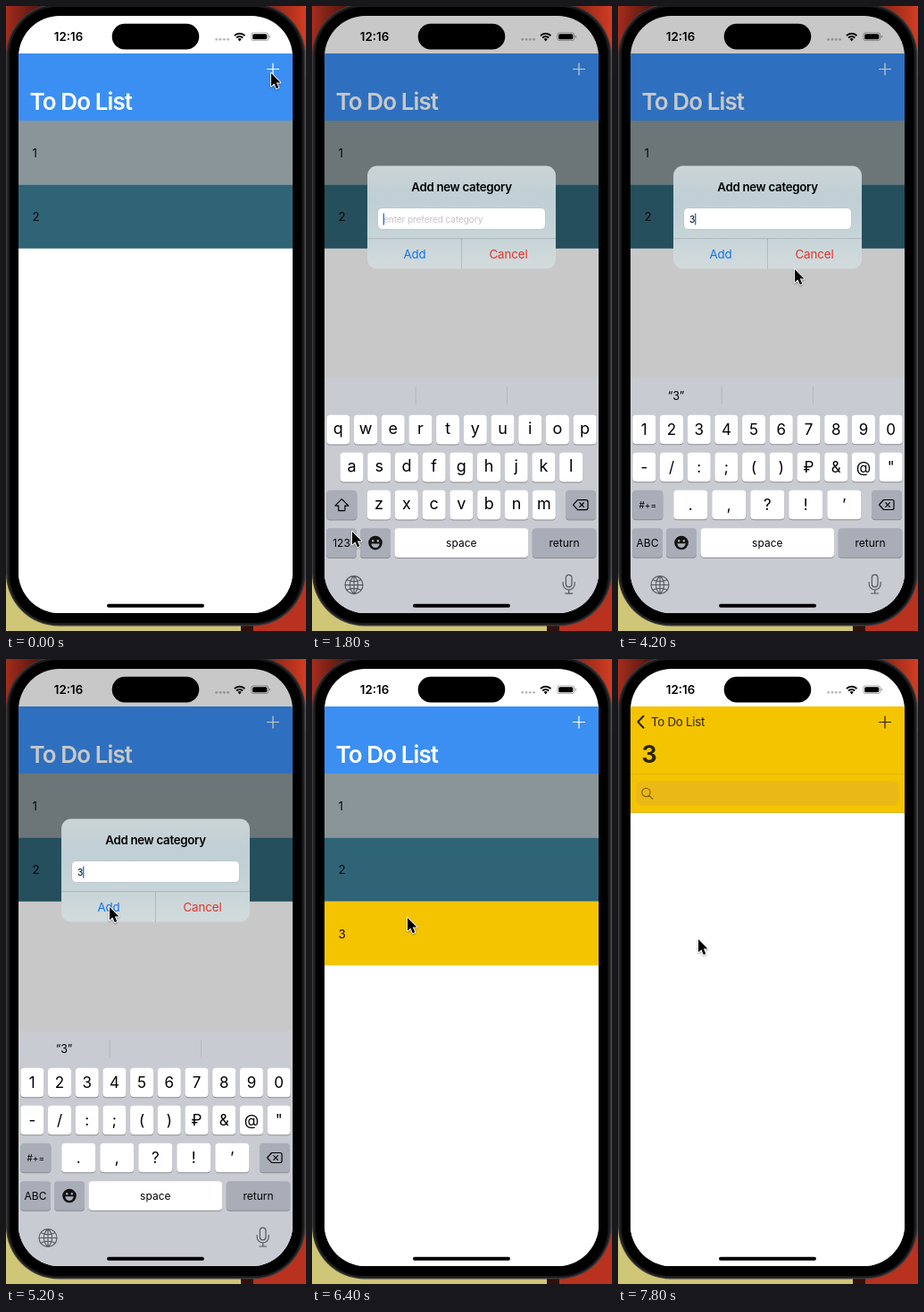
Recreate the animation shown at these times as an HTML page with a canvas. Size 336x698 px, loop 8 s.

```html
<!DOCTYPE html>
<html lang="en">
<head>
<meta charset="utf-8">
<title>To Do List</title>
<style>
  html, body { margin: 0; width: 100%; height: 100%; overflow: hidden; background: #000; }
  canvas { display: block; width: 336px; height: 698px; }
</style>
</head>
<body>
<canvas id="stage"></canvas>
<script>
const W = 336, H = 698, LOOP = 8000, STEP = 200;
const SCREEN = { x: 14, y: 11, w: 307, h: 667 };
const canvas = document.getElementById('stage');
const dpr = window.devicePixelRatio || 1;
canvas.width = W * dpr;
canvas.height = H * dpr;
const c = canvas.getContext('2d');

const INK = '#2a2408', GRAY_KEY = '#a9adb8';
const ROWS = [['1', '#899599'], ['2', '#2f6477'], ['3', '#f5c400']];
const TIMES = { alertIn: 250, keysIn: 500, numbers: 2100, typed: 3100, close: 5220, added: 5700, tap: 6700, push: 6900 };
const POINTER = [
  [0, 297, 75], [400, 297, 75], [800, 221, 230], [1800, 45, 587], [2200, 45, 587],
  [2800, 92, 478], [3200, 92, 478], [4200, 198, 294], [4800, 116, 277],
  [5600, 116, 277], [6400, 107, 289], [6800, 90, 313], [LOOP, 90, 313]
];

// Motion
const clamp = v => Math.max(0, Math.min(1, v));
const smooth = v => (v = clamp(v), v * v * (3 - 2 * v));
const springLeft = ms => { const u = Math.max(0, ms) * 0.0081; return (1 + u) * Math.exp(-u); };

function pointerAt(t) {
  const i = Math.max(1, POINTER.findIndex(p => p[0] >= t));
  const [t0, x0, y0] = POINTER[i - 1], [t1, x1, y1] = POINTER[i];
  const p = (t - t0) / (t1 - t0);
  return [x0 + (x1 - x0) * p, y0 + (y1 - y0) * p];
}

// Drawing helpers
function rect(x, y, w, h, fill) {
  c.fillStyle = fill;
  c.fillRect(x, y, w, h);
}
function round(x, y, w, h, r, fill) {
  c.beginPath();
  c.roundRect(x, y, w, h, r);
  c.fillStyle = fill;
  c.fill();
}
function disc(x, y, r, fill) {
  c.beginPath();
  c.arc(x, y, r, 0, 7);
  c.fillStyle = fill;
  c.fill();
}
function stroke(d, color, width = 1, x = 0, y = 0) {
  c.save();
  c.translate(x, y);
  c.strokeStyle = color;
  c.lineWidth = width;
  c.lineCap = c.lineJoin = 'round';
  c.stroke(new Path2D(d));
  c.restore();
}
function text(s, x, middle, size, color, { weight = 400, align = 'left', spacing = 0 } = {}) {
  c.font = `${weight} ${size}px Inter, sans-serif`;
  c.letterSpacing = spacing + 'px';
  c.textAlign = align;
  c.fillStyle = color;
  c.fillText(s, x, middle + size * 0.36);
}
function layer(draw, { x = 0, y = 0, alpha = 1, scale = 1, cx = 0, cy = 0 } = {}) {
  c.save();
  c.globalAlpha *= alpha;
  c.translate(x + cx, y + cy);
  c.scale(scale, scale);
  c.translate(-cx, -cy);
  draw();
  c.restore();
}
const plus = color => stroke('M292.5 70.5h13M299 64v13', color, 1.2);

// Phone and its surroundings
function backdrop() {
  rect(0, 0, W, H, '#b8321f');
  const top = c.createLinearGradient(0, 0, W, 0);
  top.addColorStop(0, '#a52c1c');
  top.addColorStop(0.12, '#4a1510');
  top.addColorStop(0.85, '#7a2014');
  top.addColorStop(1, '#d23c22');
  rect(0, 0, W, 80, top);
  rect(0, 600, 263, 98, '#cfc678');
  rect(263, 688, 14, 10, '#31100b');
  round(0, -3, 335.5, 695.5, 59, '#3b3a3c');
  round(1.5, -1.5, 332.5, 692.5, 57, '#1c1b1d');
  round(4, 1, 327.5, 688, 54, '#000');
}

function statusBar() {
  text('12:16', 70, 34, 13.3, '#000', { weight: 600, align: 'center' });
  for (let i = 0; i < 4; i++) disc(235.7 + i * 4.3, 37.3, 1.4, '#b9b9bb');
  for (const r of [8.2, 5]) {
    c.beginPath();
    c.arc(261.7, 39, r, -Math.PI * 0.75, -Math.PI * 0.25);
    c.strokeStyle = '#000';
    c.lineWidth = 1.9;
    c.stroke();
  }
  c.beginPath();
  c.moveTo(261.7, 39.4);
  c.arc(261.7, 39, 2.8, -Math.PI * 0.75, -Math.PI * 0.25);
  c.fillStyle = '#000';
  c.fill();
  round(274.5, 29.5, 19.5, 9.5, 3, '#9a9a9c');
  round(275.3, 30.3, 17.9, 7.9, 2.3, '#fff');
  round(276.2, 31.2, 16.1, 6.1, 1.6, '#000');
  round(294.7, 32.7, 1.2, 3, 0.6, '#9a9a9c');
}

function listScreen(t) {
  rect(14, 53, 307, 625, '#fff');
  rect(14, 53, 307, 75, '#3b8ff3');
  text('To Do List', 26.5, 106.5, 26, '#fff', { weight: 600, spacing: -0.9 });
  plus('#fff');
  ROWS.slice(0, t >= TIMES.added ? 3 : 2).forEach(([label, color], i) => {
    const y = 128 + i * 71.4;
    rect(14, y, 307, 71.4, color);
    if (label === '3' && t >= TIMES.tap) rect(14, y, 307, 71.4, 'rgba(209,209,214,.9)');
    text(label, 29.5, y + 36, 13.3, '#0a0a0a');
  });
}

function detailScreen() {
  rect(14, 53, 307, 625, '#fff');
  rect(14, 53, 307, 118.5, '#f5c400');
  rect(14, 128, 307, 0.8, '#d9ae05');
  rect(14, 171, 307, 0.8, '#d3ab0c');
  stroke('M28.5 63.8L22.3 70.3L28.5 76.8', INK, 2);
  text('To Do List', 37, 70.3, 13.3, INK, { spacing: -0.25 });
  plus(INK);
  text('3', 26.5, 106.5, 26.5, INK, { weight: 700 });
  round(20, 136, 295, 28, 8, '#ebb917');
  stroke('M36 149a4.6 4.6 0 1 0-9.2 0a4.6 4.6 0 1 0 9.2 0M34.8 152.4l4 4', '#80640f', 1.2);
}

function alertBox(t, dy) {
  const shade = c.createLinearGradient(0, 178 - dy, 0, 330 - dy);
  ['#cbd4d6', '#bfcfd5', '#c6d4d8', '#d2dadc', '#dadbdc']
    .forEach((color, i) => shade.addColorStop(i / 4, color));
  round(62, 178.5, 211, 115, 11, shade);
  text('Add new category', 167.5, 202, 13.3, '#000', { weight: 600, align: 'center', spacing: -0.3 });
  round(73.5, 225.5, 188, 24, 5, '#b9c2c5');
  round(74, 226, 187, 23, 4.5, '#fff');
  const typed = t >= TIMES.typed;
  if (typed) text('3', 80, 238, 10.2, '#000');
  else text('enter prefered category', 80, 238, 10.2, '#c4c4c6', { spacing: -0.15 });
  const phase = (t - (typed ? TIMES.typed : TIMES.keysIn)) % 1000;
  if (phase < 600 && t < TIMES.close) rect(typed ? 86 : 79.6, 231.5, 1.4, 13, '#2f78e0');
  rect(62, 259.3, 211, 0.8, 'rgba(60,60,67,.24)');
  rect(167.2, 260, 0.8, 33.5, 'rgba(60,60,67,.24)');
  text('Add', 115, 277, 13.3, '#1273e6', { align: 'center', spacing: -0.1 });
  text('Cancel', 220, 277, 13.3, '#de3329', { align: 'center', spacing: -0.1 });
}

// Keyboard
function key(cx, cy, w, label = '', size = 18, fill = '#fff', lift = 0) {
  round(cx - w / 2, cy - 15.3, w, 32.6, 4, '#898b91');
  round(cx - w / 2, cy - 16.3, w, 32.6, 4, fill);
  text(label, cx, cy - lift, size, '#000', { align: 'center' });
}
function keyRow(labels, cx, cy, pitch = 30.7, w = 26, size = 18, lift = 1.5) {
  [...labels].forEach((label, i) => key(cx + i * pitch, cy, w, label, size, '#fff', lift));
}

function keyboard(t) {
  const numbers = t >= TIMES.numbers;
  rect(14, 415, 307, 270, '#c9cbd2');
  for (const x of [115.7, 218]) rect(x, 425, 0.8, 20, '#b0b3ba');
  if (t >= TIMES.typed) text('“3”', 65, 435, 12.5, '#000', { align: 'center' });
  if (numbers) {
    keyRow('1234567890', 29.3, 473, 30.7, 26, 17, 0);
    keyRow('-/:;()₽&@"', 29.3, 515, 30.7, 26, 17, 0);
    keyRow('.,?!’', 81.3, 557, 43, 38, 17, 0);
    key(33.3, 557, 34, '#+=', 10, GRAY_KEY);
  } else {
    keyRow('qwertyuiop', 29.3, 473);
    keyRow('asdfghjkl', 44.5, 515);
    keyRow('zxcvbnm', 75, 557, 30.8);
    key(33.3, 557, 34, '', 12, GRAY_KEY);
    stroke('M0-7L7.5 .5H3.6V6H-3.6V.5H-7.5Z', '#000', 1.2, 33.3, 557.5);
  }
  key(301, 557, 34, '', 12, GRAY_KEY);
  stroke('M-8.5 0L-3.5-5.5H6Q8-5.5 8-3.5V3.5Q8 5.5 6 5.5H-3.5ZM-1.2-2.3L3.4 2.3M3.4-2.3L-1.2 2.3', '#000', 1.2, 301, 557);
  key(33, 599.5, 34, numbers ? 'ABC' : '123', 12, GRAY_KEY);
  key(71, 599.5, 34, '', 12, GRAY_KEY);
  disc(71, 599.5, 7.8, '#111');
  disc(68.2, 597.2, 1.2, GRAY_KEY);
  disc(73.8, 597.2, 1.2, GRAY_KEY);
  c.beginPath();
  c.arc(71, 600.3, 4.6, 0, Math.PI);
  c.fillStyle = GRAY_KEY;
  c.fill();
  key(167.3, 599.5, 149.5, 'space', 12);
  key(282.5, 599.5, 71.5, 'return', 12, GRAY_KEY);
  stroke('M-10 0a10 10 0 1 0 20 0a10 10 0 1 0-20 0H10M0-10V10M0-10C-6-5-6 5 0 10C6 5 6-5 0-10M-7.5-5.5Q0-2 7.5-5.5M-7.5 5.5Q0 2 7.5 5.5',
    '#54585f', 1.1, 47, 646.5);
  stroke('M-3.3-7a3.3 3.3 0 0 1 6.6 0V0a3.3 3.3 0 0 1-6.6 0ZM-6.5-2V0a6.5 6.5 0 0 0 13 0V-2M0 6.5V10.5M-4 10.5H4',
    '#54585f', 1.2, 287.7, 645.5);
}

function pointer([x, y]) {
  const arrow = new Path2D('M0 0V14.6L3.4 11.5L5.9 17.2L8.3 16.1L5.8 10.6H10.4Z');
  c.save();
  c.translate(x, y);
  c.shadowColor = 'rgba(0,0,0,.35)';
  c.shadowBlur = 2 * dpr;
  c.shadowOffsetY = dpr;
  c.lineWidth = 1.8;
  c.lineJoin = 'round';
  c.strokeStyle = '#fff';
  c.stroke(arrow);
  c.shadowColor = 'transparent';
  c.fillStyle = '#000';
  c.fill(arrow);
  c.restore();
}

function render(t) {
  const closing = t >= TIMES.close;
  const appear = smooth((t - TIMES.alertIn) / 400);
  const shown = closing ? 1 - smooth((t - TIMES.close + 20) / 480) : appear;
  const keysDown = closing ? 1 - springLeft(t - TIMES.close) : springLeft(t - TIMES.keysIn);
  const push = smooth((t - TIMES.push) / 500);

  c.setTransform(dpr, 0, 0, dpr, 0, 0);
  backdrop();
  c.save();
  c.beginPath();
  c.roundRect(SCREEN.x, SCREEN.y, SCREEN.w, SCREEN.h, 46);
  c.clip();
  rect(14, 11, 307, 667, '#fff');
  layer(() => listScreen(t), { x: -92 * push });
  if (push > 0) layer(detailScreen, { x: 307 * (1 - push) });
  statusBar();
  if (shown > 0) {
    rect(14, 11, 307, 667, `rgba(0,0,0,${0.215 * shown})`);
    const dy = closing ? 0 : 118 * keysDown;
    layer(() => alertBox(t, dy), { y: dy, alpha: shown, scale: closing ? 1 : 1.15 - 0.15 * appear, cx: 167.5, cy: 236 });
  }
  if (keysDown < 0.999) layer(() => keyboard(t), { y: 263 * keysDown });
  round(113, 667.7, 109, 4, 2, '#000');
  c.restore();
  round(118.7, 19.7, 97.6, 28.8, 14.4, '#000');
  pointer(pointerAt(t));
}

function tick(now) {
  render(Math.floor((now % LOOP) / STEP) * STEP);
  requestAnimationFrame(tick);
}
requestAnimationFrame(tick);
</script>
</body>
</html>
```
